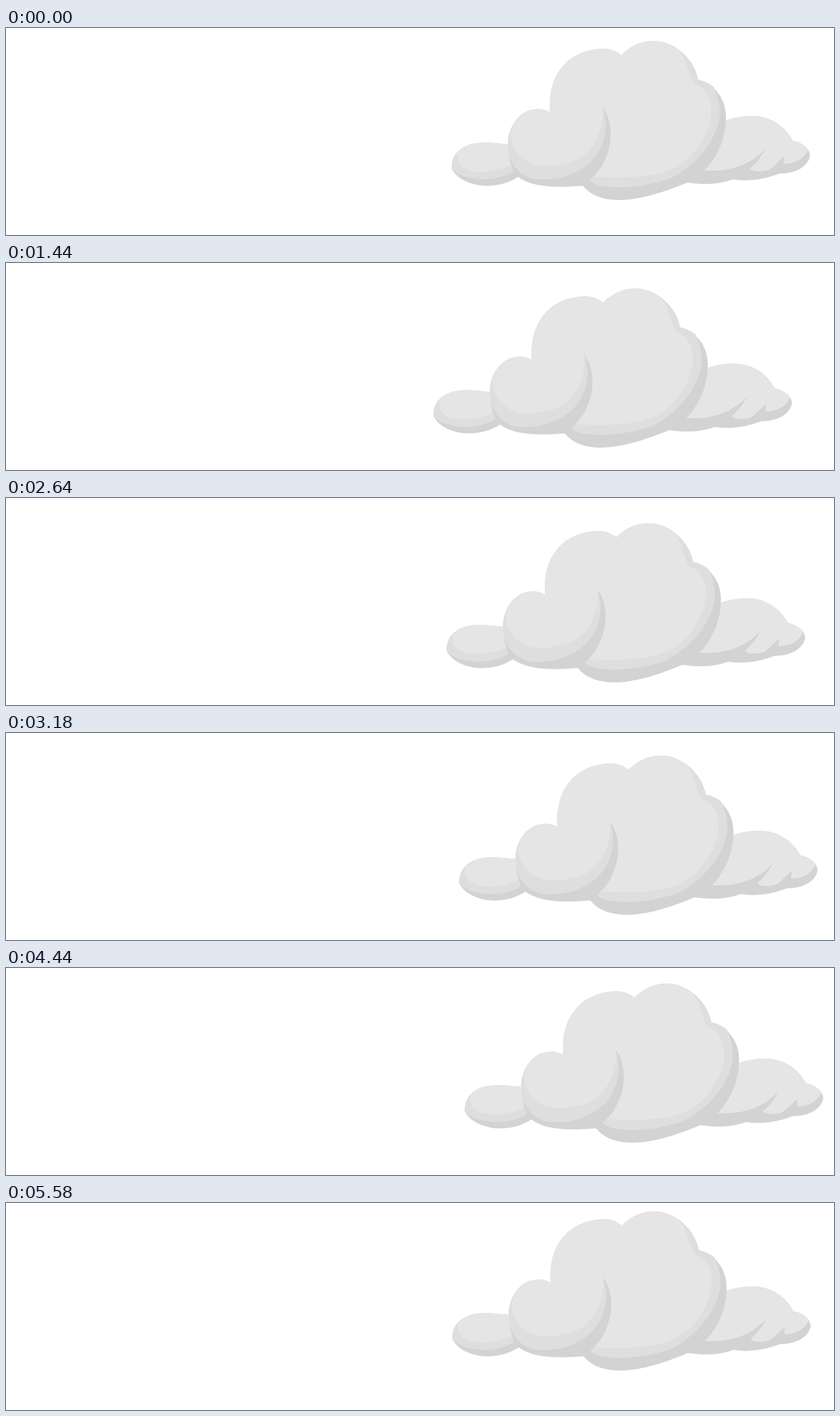
An HTML page that plays this animation: 1280x320 px, repeating every 5.64 s.

```html
<!DOCTYPE html>
<html lang="en">
<head>
<meta charset="utf-8">
<title>Drifting cloud</title>
<style>
  html, body { margin: 0; width: 100%; height: 100%; overflow: hidden; background: #fff; }
  svg { display: block; width: 100%; height: 100%; }
  .light { fill: #e5e5e5; }
  .mid { fill: #dedede; }
  .dark { fill: #d3d3d3; }
</style>
</head>
<body>
<svg viewBox="0 0 1280 320">
  <g id="cloud">
    <!-- left puff -->
    <path class="dark" d="M689 217C688 192 708 176 745 177L778 180L792 230C777 240 760 244 741 244C715 243 695 231 689 217Z"/>
    <path class="mid" d="M689 217C688 192 708 176 745 177L778 180L786 221C770 231 755 234 737 234C715 233 695 227 689 217Z"/>
    <path class="light" d="M698 192C706 182 722 176 745 177L778 180L783 212C760 221 745 223 728 222C708 220 700 212 698 203Z"/>
    <!-- right puff -->
    <path class="dark" d="M1113 143C1126 138 1140 136 1153 136C1184 136 1206 154 1216 174C1232 177 1243 188 1243 197C1241 212 1224 225 1196 225C1172 234 1148 238 1124 234C1100 243 1075 242 1053 239Z"/>
    <path class="light" d="M1113 143C1126 138 1140 136 1153 136C1184 136 1206 154 1216 174C1228 177 1237 182 1240 188C1234 203 1220 210 1202 210L1203 198C1196 204 1188 214 1178 220C1168 222 1154 223 1150 217C1160 209 1165 202 1174 187C1148 214 1115 223 1076 220Z"/>
    <!-- main body -->
    <path class="dark" d="M841 130C837 70 870 33 925 32C938 33 945 37 951 42C968 25 985 20 1001 20C1035 20 1065 50 1070 80C1095 87 1113 108 1113 138C1113 185 1085 225 1053 239C1010 257 975 266 948 266C925 266 905 260 892 244L860 200Z"/>
    <path class="mid" d="M841 130C837 70 870 33 925 32C938 33 945 37 951 42C968 25 985 20 1001 20C1035 20 1065 50 1070 80C1080 82 1088 86 1094 91C1102 108 1105 125 1103 138C1098 175 1065 215 1024 234C990 244 965 247 943 246C920 246 908 242 902 235L860 200Z"/>
    <path class="light" d="M841 130C837 70 870 33 925 32C938 33 945 37 951 42C968 25 985 20 1001 20C1017 20 1032 27 1043 37C1053 52 1056 75 1064 87C1080 92 1090 108 1090 126C1090 170 1055 215 1010 225C980 232 945 231 906 230L860 200Z"/>
    <!-- front puff -->
    <path class="dark" d="M922 123C936 138 938 172 930 193C924 212 914 226 902 235L892 244C850 247 815 247 791 230C783 222 778 207 777 188Z"/>
    <path class="mid" d="M841 130C833 126 825 124 815 126C793 128 775 155 776 180L777 192C780 212 797 231 820 234C835 235 862 234 882 222C920 205 936 160 922 123L880 100Z"/>
    <path class="light" d="M841 130C833 126 825 124 815 126C797 128 783 147 780 165C783 192 803 214 836 213C850 213 857 210 873 207C908 197 926 155 922 123L880 80Z"/>
  </g>
</svg>
<script>
  const LOOP = 5640, STEP = 60;
  // time, x, y
  const path = [[0, 0, 0], [1850, -36, 25], [3750, 32, 10.7], [LOOP, 0, -7.5]];
  const cloud = document.getElementById('cloud');

  function draw() {
    const t = Math.floor(performance.now() % LOOP / STEP) * STEP;
    const i = path.findIndex(p => p[0] > t);
    const [t0, x0, y0] = path[i - 1], [t1, x1, y1] = path[i];
    const k = (t - t0) / (t1 - t0);
    cloud.setAttribute('transform', `translate(${x0 + (x1 - x0) * k} ${y0 + (y1 - y0) * k})`);
    requestAnimationFrame(draw);
  }
  draw();
</script>
</body>
</html>
```
